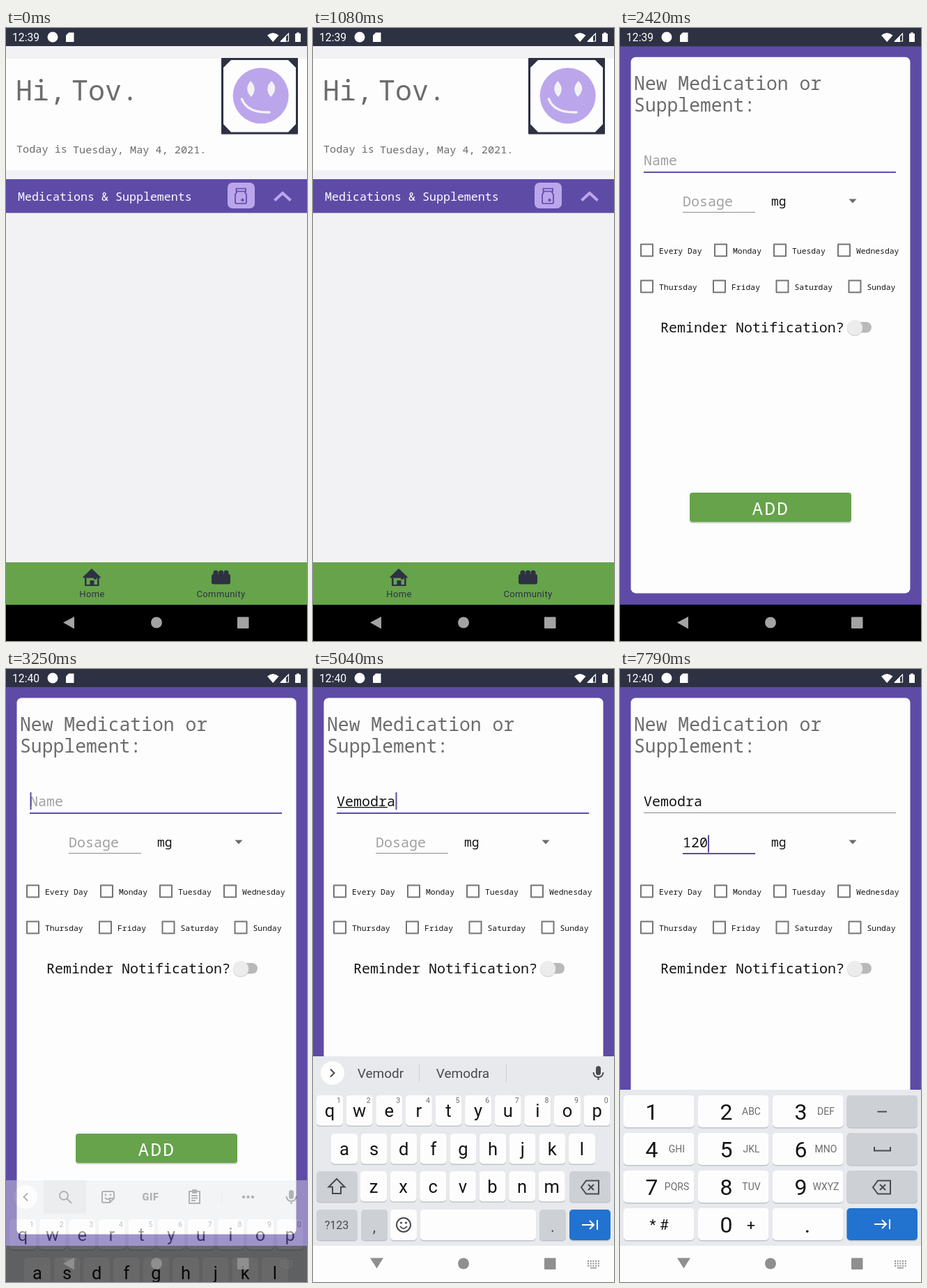
An HTML page for the animation above (8 s loop, 432x880 px).

```html
<!DOCTYPE html>
<html lang="en">
<head>
<meta charset="utf-8">
<title>Medication form</title>
<style>
html, body { margin: 0; width: 100%; height: 100%; overflow: hidden; background: #000; }
svg { display: block; width: 432px; height: 880px; }
text { font-family: "Noto Sans Mono", monospace; }
.ui { font-family: Roboto, sans-serif; }
.mid { text-anchor: middle; }
.line { fill: none; stroke-width: 2; }
</style>
</head>
<body>
<svg id="stage" viewBox="0 0 432 880"></svg>
<script>
const LOOP = 8000;
const DRUG = 'Vemodra', DOSE = '120';
const OPEN = 2161, KEYS_UP = 3160, CAPS = 3400, EXPAND = 1710, MINUTE = 3000, NEXT_FIELD = 5210;
const LETTERS = [4000, 4200, 4380, 4580, 4720, 4880, 5040];
const DIGITS = [6000, 6210, 6710];
const BLINKS = [2500, 3000, ...LETTERS, NEXT_FIELD, 6040, 6710];

const C = {
  back: '#f2f2f4', paper: '#fdfdfd', purple: '#5e4ba6', green: '#66a34b', slate: '#2d3142',
  grey: '#6c6c6c', hint: '#a0a0a0', ink: '#141414', lilac: '#bba6ec',
  board: '#e7e9ed', fn: '#cdd0d5', shade: '#bfc2c7', rule: '#cdd0d4', blue: '#2173cf', icon: '#484a4e',
  navDark: '#a3a3a3', navLight: '#8f8f8f'
};

const rect = (x, y, x2, y2, fill, r = 0, more = '') =>
  `<rect x="${x}" y="${y}" width="${x2 - x}" height="${y2 - y}" rx="${r}" fill="${fill}" ${more}/>`;
const circle = (x, y, r, fill, more = '') => `<circle cx="${x}" cy="${y}" r="${r}" fill="${fill}" ${more}/>`;
const text = (x, y, size, str, fill = C.ink, cls = '', more = '') =>
  `<text x="${x}" y="${y}" font-size="${size}" fill="${fill}" class="${cls}" ${more}>${str}</text>`;
const shape = (d, fill, more = '') => `<path d="${d}" fill="${fill}" ${more}/>`;
const line = (d, stroke, more = '') => `<path class="line" d="${d}" stroke="${stroke}" ${more}/>`;
const ring = (x, y, r) => circle(x, y, r, 'none', `stroke="${C.icon}" stroke-width="2"`);
const group = (id, body) => `<g id="${id}">${body}</g>`;

function homeScreen() {
  const avatar = rect(309, 43, 419, 152.5, C.slate, 1)
    + shape('M323 46H405L416 57V138L405 149.5H323L312 138V57Z', C.paper)
    + circle(365.7, 97.3, 40, C.lilac)
    + shape('M351 76Q362 87 352 99Q341 88 351 76ZM381 76Q392 87 380 99Q370 87 381 76Z', C.back)
    + line('M338.5 102Q346 122 378 121', C.back, 'stroke-linecap="round" style="stroke-width:3.5"');
  const bottle = rect(318, 222, 357, 259, C.lilac, 7)
    + line('M330.5 230.5H344V234.5H330.5ZM331.5 235L329 239V250Q329 252 331 252H343Q345 252 345 250V239L342.5 235M337 247H342M339.5 244.5V249.5', C.purple, 'style="stroke-width:1.7"');
  const house = shape('M110.5 788L123 776L135.5 788V789.5H133.5V801H113V789.5H110.5Z', C.slate)
    + shape('M115.5 789.5H131V799H126.5V793H120.5V799H115.5Z', C.green)
    + shape('M121.5 794H125.5V801H121.5ZM126 788H130V791.5H126Z', C.slate);
  const people = rect(295, 784, 322, 798.5, C.slate, 3)
    + [301, 308.5, 316].map(x => circle(x, 782, 3.6, C.slate)).join('');
  const tab = (x, label) => text(x, 817, 13, label, C.slate, 'ui mid', 'letter-spacing=".4"');
  return rect(0, 0, 432, 828, C.back) + rect(0, 0, 432, 26, C.slate) + rect(0, 44, 432, 204, C.paper)
    + text(14, 104, 40, 'Hi,', C.grey) + text(94, 104, 40, 'Tov.', C.grey)
    + text(15, 179, 15.2, 'Today is', C.grey) + text(96, 180, 15.2, 'Tuesday, May 4, 2021.', C.grey)
    + avatar
    + rect(0, 217, 432, 265.5, C.purple)
    + group('panel', rect(0, 265, 432, 314.5, C.purple) + rect(11, 278, 421, 303.5, C.paper)
      + text(17, 295, 11.2, 'Nothing Added Yet.', C.grey))
    + text(17, 247.5, 16.67, 'Medications &amp; Supplements', C.paper) + bottle
    + line('', C.lilac, 'id="chevron" style="stroke-width:4"')
    + rect(0, 767, 432, 828, C.green) + house + people
    + tab(123.5, 'Home') + tab(308.5, 'Community');
}

function formScreen() {
  const day = y => ([name, x]) =>
    line(`M${x} ${y - 8.5}h17v17h-17z`, '#747474', 'stroke-linejoin="round"')
    + text(x + 26, y + 4.5, 11.4, name);
  const week = [['Every Day', 30], ['Monday', 136], ['Tuesday', 221], ['Wednesday', 313]].map(day(319)).join('')
    + [['Thursday', 30], ['Friday', 134], ['Saturday', 224.5], ['Sunday', 328.5]].map(day(371)).join('');
  return rect(0, 0, 432, 880, '#000') + rect(0, 26, 432, 828, C.purple) + rect(0, 0, 432, 26, C.slate)
    + rect(15.5, 41.5, 416.5, 811.5, C.paper, 7)
    + text(20, 89, 26.4, 'New Medication or', C.grey) + text(20, 119.5, 26.4, 'Supplement:', C.grey)
    + text(34, 197, 20, '', C.ink, '', 'id="name"') + rect(34, 206, 396, 208, C.purple, 0, 'id="nameLine"')
    + rect(35, 198, 35, 199.3, C.ink, 0, 'id="compose"')
    + text(90, 256, 20, '', C.ink, '', 'id="dose"') + rect(90, 264, 194, 265, C.purple, 0, 'id="doseLine"')
    + rect(0, 0, 2, 25, C.purple, 0, 'id="cursor"')
    + text(217, 255, 18, 'mg') + shape('M328.5 245.5H339.5L334 251.5Z', C.grey)
    + week
    + text(58, 437, 20, 'Reminder Notification?')
    + rect(328, 422, 361, 437.5, '#b9b9b9', 7.7) + circle(337, 431, 11.3, '#d4d4d4') + circle(337, 430, 11, '#ececec')
    + rect(100, 669, 332, 711, '#cfcfcf', 4) + rect(100, 667, 332, 709, C.green, 4)
    + text(189.5, 699, 26, 'ADD', C.paper, '', 'letter-spacing="2.3"');
}

const key = (x, y, x2, y2, fill = C.paper) => rect(x, y + 1.5, x2, y2 + 1.5, C.shade, 5) + rect(x, y, x2, y2, fill, 5);
const backspace = (x, y) => line(`M${x - 13} ${y}l7-9.5h18v19h-18zM${x - 3} ${y - 4}l8 8m0-8l-8 8`, C.icon);
const enter = (x, y) => line(`M${x - 11} ${y}h17m-6-6l6 6l-6 6M${x + 11} ${y - 7}v14`, '#fff');

function letterBoard() {
  const rows = [['qwertyuiop', 24, 612], ['asdfghjkl', 45, 667], ['zxcvbnm', 87, 721]];
  let out = '';
  for (const [chars, x0, y] of rows) {
    [...chars].forEach((c, i) => {
      const x = x0 + i * 42.62;
      out += key(x - 19, y, x + 19, y + 43.5) + text(x, y + 31, 25.5, c, C.ink, 'ui mid letter');
      if (y === 612) out += text(x + 13, 623, 10.5, (i + 1) % 10, C.grey, 'ui mid');
    });
  }
  const bottom = key(5, 721, 64, 765, C.fn)
    + shape('M34 732L45.5 743.5H40V753H28V743.5H22.5Z', C.icon, `id="shift" stroke="${C.icon}" stroke-width="2"`)
    + key(368, 721, 427, 765, C.fn) + backspace(398, 744)
    + key(5, 776, 64, 820, C.fn) + text(34, 804, 16, '?123', C.icon, 'ui mid')
    + key(69, 776, 107, 820, C.fn) + text(88, 808, 22, ',', C.icon, 'ui mid')
    + key(111, 776, 149, 820) + ring(130, 798, 10)
    + circle(126.5, 795, 1.6, C.icon) + circle(133.5, 795, 1.6, C.icon) + line('M125 800Q130 806.5 135 800', C.icon)
    + key(154, 776, 320, 820) + key(325, 776, 363, 820, C.fn) + text(344, 808, 22, '.', C.icon, 'ui mid')
    + key(368, 776, 427, 820, C.blue) + enter(397, 798);
  const tools = rect(54, 556, 115, 604, '#d4d7db')
    + ring(83, 578, 6) + line('M87.5 582.5L94 589', C.icon)
    + line('M140 572H153Q155 572 155 574V582L149 588H140Q138 588 138 586V574Q138 572 140 572ZM149 588V582H155M142 581Q145 585 148 582', C.icon)
    + circle(143, 577, 1.4, C.icon) + circle(150, 577, 1.4, C.icon)
    + text(207.5, 585, 14.5, 'GIF', C.icon, 'ui mid', 'font-weight="900" letter-spacing=".6"')
    + line('M263 572H278V589H263ZM266 578H275M266 581.5H275M266 585H272', C.icon) + rect(267, 569, 274, 575, C.icon, 1)
    + rect(309, 569, 310, 591, C.rule)
    + [341, 347.5, 354].map(x => circle(x, 580, 2.2, C.icon)).join('');
  const words = rect(152, 568, 153, 593, C.rule) + rect(277, 568, 278, 593, C.rule)
    + text(97, 587, 19, '', C.icon, 'ui mid', 'id="guess"') + text(215, 587, 19, DRUG, C.icon, 'ui mid');
  return rect(0, 556, 432, 828, C.board) + group('tools', tools) + group('words', words)
    + circle(28, 580, 17, C.paper) + line('', C.icon, 'id="more"')
    + rect(406, 570, 413, 583, C.icon, 3.5) + line('M402.5 579Q403 586 409.5 586Q416 586 416.5 579M409.5 586V590', C.icon)
    + out + bottom;
}

function digitBoard() {
  const subs = ['', 'ABC', 'DEF', 'GHI', 'JKL', 'MNO', 'PQRS', 'TUV', 'WXYZ'];
  const cols = [5, 112, 219, 325.5];
  let out = rect(0, 604, 432, 828, C.board);
  for (let r = 0; r < 4; r++) {
    const y = 612 + r * 54;
    cols.forEach((x, c) => {
      out += key(x, y, x + 101.5, y + 46, c < 3 ? C.paper : r < 3 ? C.fn : C.blue);
      if (r === 3 || c === 3) return;
      const n = r * 3 + c;
      out += text(x + 40.5, y + 35, 32, n + 1, C.ink, 'ui mid') + text(x + 76.5, y + 28, 14, subs[n], C.grey, 'ui mid');
    });
  }
  return out + text(56, 805, 21, '* #', C.ink, 'ui mid') + text(152.5, 809, 32, '0', C.ink, 'ui mid')
    + text(188, 805, 21, '+', C.ink, 'ui mid') + text(269, 809, 32, '.', C.ink, 'ui mid')
    + line('M369.5 635.5H383', C.icon) + line('M365 686V691.5H388V686', C.icon)
    + backspace(376, 744) + enter(376, 797);
}

const navRest = fill => circle(216, 853.5, 8, fill) + rect(332, 845.5, 348.5, 862, fill, 1);
const navDark = shape('M82 853.5L98 845V862.5Z', C.navDark) + navRest(C.navDark);
const dots = [0, 1, 2].map(r => [0, 1, 2, 3, 4].map(i =>
  rect(394 + i * 3.7, 849 + r * 3.4, 396 + i * 3.7, 851 + r * 3.4, C.navLight)).join('')).join('');
const navLight = shape('M82 845.5H101L91.5 860.5Z', C.navLight) + navRest(C.navLight) + dots + rect(398, 859, 407, 860.5, C.navLight);

const statusIcons = text(9, 19, 15.7, '', '#fff', 'ui', 'id="clock"') + circle(67, 13, 7.5, '#fff')
  + shape('M90 6.5H97.5V20H86V10.5Z', '#fff') + shape('M375 10.5Q383 3.5 391.5 10.5L383.2 20Z', '#fff')
  + line('M394.5 19L405.5 8V19Z', '#fff', 'style="stroke-width:1.2"') + shape('M393.5 20L402 11.5V20Z', '#fff')
  + shape('M417 6.5H421V8H423V20H415V8H417Z', '#fff');

const stage = document.getElementById('stage');
stage.innerHTML = rect(0, 0, 432, 880, '#000') + group('home', homeScreen()) + group('form', formScreen())
  + group('board', group('letters', letterBoard()) + group('digits', digitBoard()) + rect(0, 828, 432, 880, C.paper))
  + group('navDark', navDark) + group('navLight', navLight) + statusIcons;

const el = {};
stage.querySelectorAll('[id]').forEach(e => el[e.id] = e);
const letters = [...stage.querySelectorAll('.letter')];

const clamp = v => Math.min(1, Math.max(0, v));
const bez = (s, a, b, c, d) => (1 - s) ** 3 * a + 3 * (1 - s) ** 2 * s * b + 3 * (1 - s) * s * s * c + s ** 3 * d;
function curve(x, [x0, y0, x1, y1, x2, y2, x3, y3]) {
  let lo = 0, hi = 1;
  for (let i = 0; i < 24; i++) {
    const m = (lo + hi) / 2;
    if (bez(m, x0, x1, x2, x3) < x) lo = m; else hi = m;
  }
  return bez(lo, y0, y1, y2, y3);
}
const openEase = x => x < 1 / 6
  ? curve(x, [0, 0, .05, 0, .1333, .06, .1667, .4])
  : curve(x, [.1667, .4, .2083, .82, .25, 1, 1, 1]);
const slideEase = x => curve(x, [0, 0, .4, 0, .2, 1, 1, 1]);

const count = (times, t) => times.filter(x => x <= t).length;
const attrs = (e, o) => { for (const k in o) e.setAttribute(k, o[k]); };
const show = (e, on) => attrs(e, { display: on ? 'inline' : 'none' });
const zoom = (e, k) => attrs(e, { transform: `translate(216 440) scale(${k}) translate(-216 -440)` });

function underline(e, y, active) {
  attrs(e, { y, height: active ? 2 : 1, fill: active ? C.purple : '#8a8a8a' });
}

function field(e, value, hint) {
  e.textContent = value || hint;
  attrs(e, { fill: value ? C.ink : C.hint });
}

function render(t) {
  const opened = openEase(clamp((t - OPEN) / 300));
  const expanded = t >= EXPAND;
  zoom(el.home, 1 + .05 * opened);
  zoom(el.form, .85 + .15 * opened);
  show(el.home, opened < .999);
  show(el.form, t >= OPEN);
  attrs(el.form, { opacity: clamp((t - OPEN - 35) / 50) });
  show(el.panel, expanded);
  attrs(el.chevron, { d: expanded ? 'M385.5 237L397 247.5L408.5 237' : 'M385.5 247.5L397 237L408.5 247.5' });
  el.clock.textContent = t < MINUTE ? '12:39' : '12:40';

  const up = clamp((t - KEYS_UP) / 275);
  attrs(el.board, { transform: `translate(0 ${324 * (1 - slideEase(up))})`, opacity: clamp(up * 1.25) });
  show(el.board, up > 0);
  attrs(el.navDark, { opacity: 1 - up });
  attrs(el.navLight, { opacity: up });

  const onDose = t >= NEXT_FIELD;
  const typed = count(LETTERS, t), seen = count(LETTERS, t - 70), dosed = count(DIGITS, t);
  show(el.letters, !onDose);
  show(el.digits, onDose);
  show(el.tools, !seen);
  show(el.words, seen);
  el.guess.textContent = DRUG.slice(0, seen);
  attrs(el.more, { d: seen ? 'M25 574.5L30.5 580L25 585.5' : 'M31 574.5L25.5 580L31 585.5' });
  const caps = t >= CAPS && !typed;
  letters.forEach(e => e.textContent = caps ? e.textContent.toUpperCase() : e.textContent.toLowerCase());
  attrs(el.shift, { fill: caps ? C.icon : 'none' });

  field(el.name, DRUG.slice(0, typed), 'Name');
  field(el.dose, DOSE.slice(0, dosed), 'Dosage');
  attrs(el.compose, { width: onDose ? 0 : seen * 12 });
  underline(el.nameLine, 206, !onDose);
  underline(el.doseLine, 264, onDose);

  const last = BLINKS[count(BLINKS, t) - 1];
  show(el.cursor, last && Math.floor((t - last) / 500) % 2 === 0);
  attrs(el.cursor, onDose ? { x: 90 + dosed * 12, y: 238.5 } : { x: 34.5 + typed * 12, y: 177 });
}

const start = performance.now();
function tick() {
  render((performance.now() - start) % LOOP);
  requestAnimationFrame(tick);
}
tick();
</script>
</body>
</html>
```
